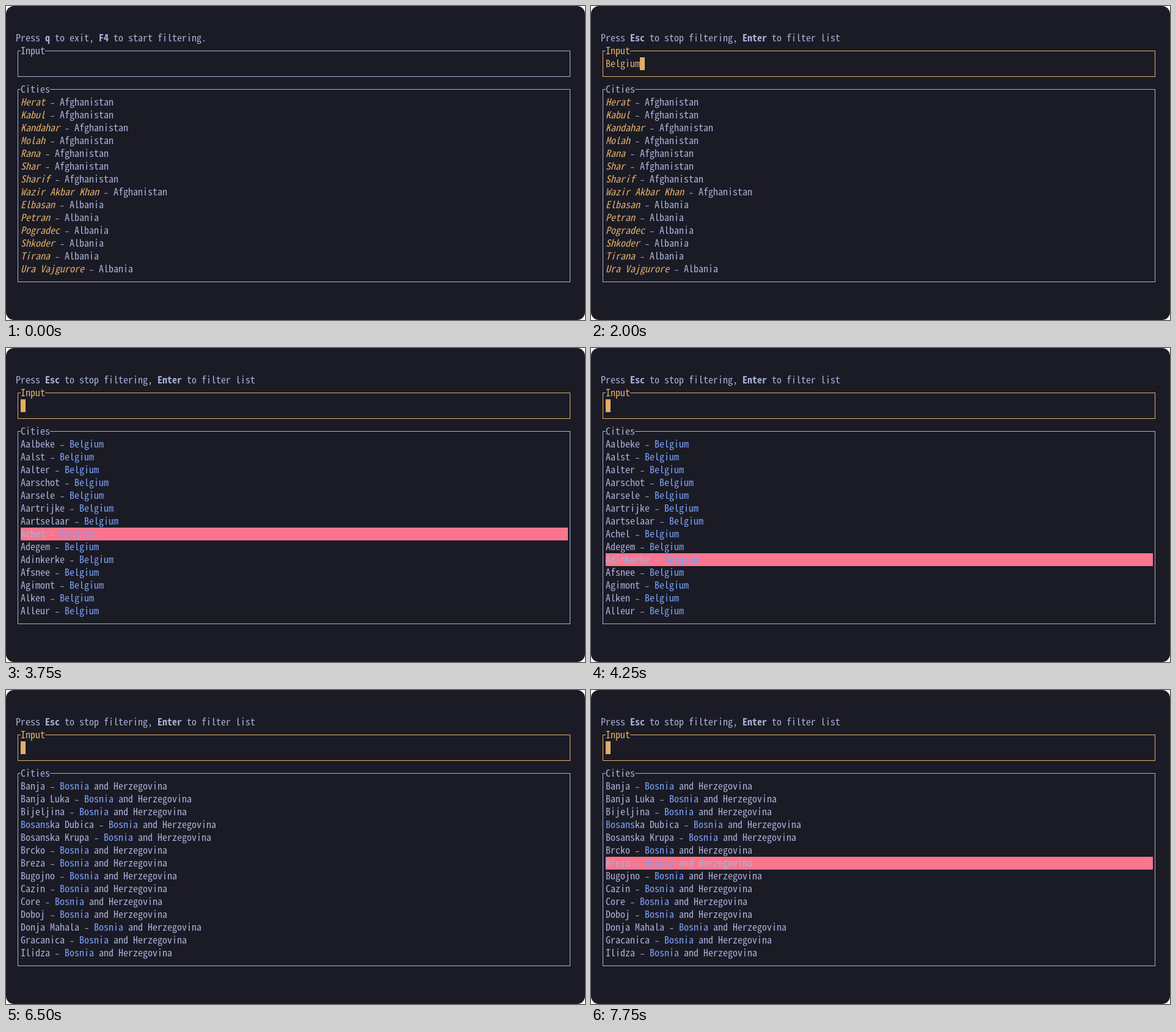
Write an HTML page that moves like this. It is 948 by 514 pixels and loops after 8000 ms.

```html
<!DOCTYPE html>
<html lang="en">
<head>
<meta charset="utf-8">
<title>City filter</title>
<style>
  :root { --bg: #1b1b26; --fg: #a9b1d6; --amber: #e0af68; --pink: #f9768e; --blue: #7aa2f7; }
  html, body { margin: 0; width: 100%; height: 100%; overflow: hidden; background: #fff; }
  #term {
    position: relative; width: 948px; height: 514px; border-radius: 13px; overflow: hidden;
    background: var(--bg); color: var(--fg);
    font: 16px/19px "Noto Sans Mono CJK JP", "Noto Sans Mono", monospace;
    font-kerning: none; font-variant-ligatures: none; white-space: pre;
  }
  #term > * { position: absolute; }
  .box { left: 19px; width: 903px; border: 1px solid var(--fg); }
  .title { left: 24px; height: 21px; background: var(--bg); }
  #hint { left: 16px; top: 42px; }
  #input { left: 24px; top: 84px; height: 21px; color: var(--amber); }
  #cursor { top: 84px; width: 8px; height: 21px; background: var(--amber); }
  #rows { left: 24px; top: 147px; width: 896px; }
  #rows div { height: 21px; }
  #rows .on { background: var(--pink); }
  #rows i, .focus .field { color: var(--amber); border-color: var(--amber); }
  #rows mark { background: none; color: var(--blue); }
  #rows u { font: 13.33px/0 "Noto Sans Mono", monospace; letter-spacing: 0; text-decoration: none; }
</style>
</head>
<body>
<div id="term">
  <div id="hint"></div>
  <div class="box field" style="top:73px;height:41px"></div>
  <div class="box" style="top:136px;height:314px"></div>
  <div class="title field" style="top:63px">Input</div>
  <div class="title" style="top:126px">Cities</div>
  <div id="input"></div>
  <div id="cursor"></div>
  <div id="rows"></div>
</div>
<script>
const LOOP = 8000, TICK = 250, CELL = 8, KEY = 200;
const $ = id => document.getElementById(id);

const cities = (names, country) => names.split(',').map(n => `${n} <u>–</u> ${country}`);
const italic = row => row.replace(/^(.*) <u>/, '<i>$1</i> <u>');
const marked = re => row => row.replace(re, '<mark>$&</mark>');

const all = [
  ...cities('Herat,Kabul,Kandahar,Molah,Rana,Shar,Sharif,Wazir Akbar Khan', 'Afghanistan'),
  ...cities('Elbasan,Petran,Pogradec,Shkoder,Tirana,Ura Vajgurore', 'Albania')
].map(italic);
const belgium = cities('Aalbeke,Aalst,Aalter,Aarschot,Aarsele,Aartrijke,Aartselaar,Achel,' +
  'Adegem,Adinkerke,Afsnee,Agimont,Alken,Alleur', 'Belgium').map(marked(/Belgium/));
const bosnia = cities('Banja,Banja Luka,Bijeljina,Bosanska Dubica,Bosanska Krupa,Brcko,Breza,Bugojno,' +
  'Cazin,Core,Doboj,Donja Mahala,Gracanica,Ilidza', 'Bosnia and Herzegovina')
  .map(marked(/Bosnia|Bosans(?=ka Dubica)/g));

const idleHint = 'Press <b>q</b> to exit, <b>F4</b> to start filtering.';
const filterHint = 'Press <b>Esc</b> to stop filtering, <b>Enter</b> to filter list';

const keys = (t, start) => Math.floor((t - start) / KEY);

function stateAt(t) {
  const s = { focus: t >= 250, text: '', list: all, row: -1 };
  if (t < 2250) s.text = 'Belgium'.slice(0, Math.max(0, t / TICK - 1));
  else if (t < 6500) {
    s.list = belgium;
    if (t >= 2500) s.row = Math.min(13, keys(t, 2320));
    if (t >= 5250) s.text = 'Bosnia'.slice(0, keys(t, 5120) + 1);
  } else {
    s.list = bosnia;
    if (t > 6500) s.row = keys(t, 6500);
  }
  return s;
}

function draw(t) {
  const s = stateAt(t);
  $('term').classList.toggle('focus', s.focus);
  $('hint').innerHTML = s.focus ? filterHint : idleHint;
  $('input').textContent = s.text;
  $('cursor').style.left = 24 + s.text.length * CELL + 'px';
  $('cursor').hidden = !s.focus;
  $('rows').innerHTML = s.list
    .map((row, i) => `<div${i === s.row ? ' class="on"' : ''}>${row}</div>`).join('');
}

// Keep every glyph centred on the terminal's cell grid.
function fitGrid() {
  const probe = document.createElement('span');
  probe.textContent = 'M'.repeat(50);
  $('term').append(probe);
  const gap = CELL - probe.getBoundingClientRect().width / 50;
  probe.remove();
  $('term').style.letterSpacing = gap + 'px';
  $('term').style.textIndent = gap / 2 + 'px';
}

let shown = -1;
function frame() {
  const t = Math.floor(performance.now() % LOOP / TICK) * TICK;
  if (t !== shown) draw(shown = t);
  requestAnimationFrame(frame);
}
fitGrid();
frame();
</script>
</body>
</html>
```
